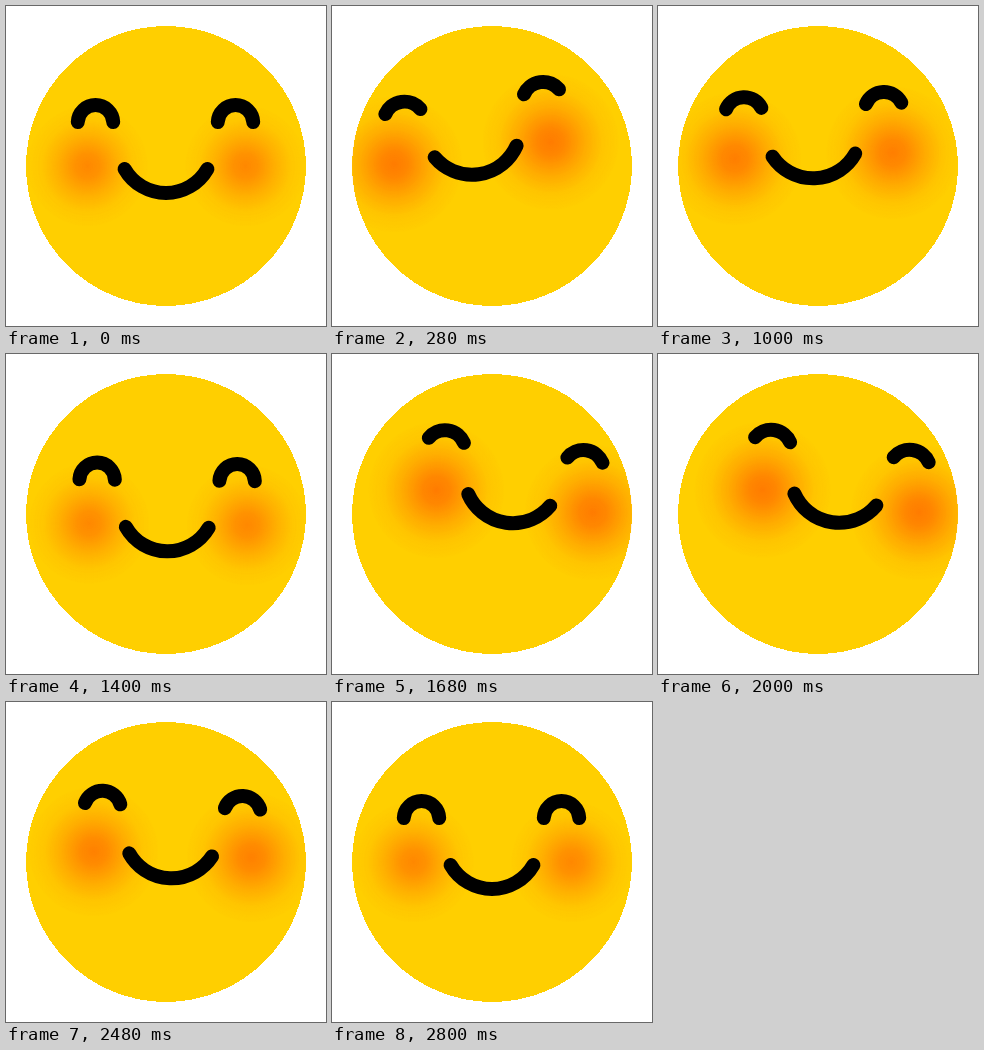
Write an HTML page that moves like this. It is 320x320 px and loops after 2.84 s.

```html
<!DOCTYPE html>
<html lang="en">
<head>
<meta charset="utf-8">
<title>Swaying smile</title>
<style>
  html, body { margin: 0; width: 100%; height: 100%; overflow: hidden; background: #fff; }
  svg { display: block; width: 100vw; height: 100vh; }
  .line { fill: none; stroke: #000; stroke-width: 14; stroke-linecap: round; }
</style>
</head>
<body>
<svg viewBox="0 0 320 320">
  <defs>
    <radialGradient id="glow">
      <stop offset="0" stop-color="#ff7600"/>
      <stop offset=".2" stop-color="#ff7600" stop-opacity=".86"/>
      <stop offset=".5" stop-color="#ff7600" stop-opacity=".42"/>
      <stop offset=".75" stop-color="#ff7600" stop-opacity=".12"/>
      <stop offset="1" stop-color="#ff7600" stop-opacity="0"/>
    </radialGradient>
    <clipPath id="face"><circle cx="160" cy="160" r="140"/></clipPath>
  </defs>
  <circle cx="160" cy="160" r="140" fill="#ffcf00" shape-rendering="crispEdges"/>
  <g clip-path="url(#face)">
    <g id="blush" fill="url(#glow)">
      <circle cx="-79"/>
      <circle cx="79"/>
    </g>
    <path id="mouth" class="line"/>
    <path id="eyes" class="line"/>
  </g>
</svg>
<script>
const LOOP = 2840, STEP = 40, TILT = 8.2, DIP = 10.3;

// Each part has a resting place and its own reach, which gives the face depth
const parts = {
  eyes:  { x: 159.5, y: 116, sway: 22, lift: 20.3, drift: 2.4 },
  mouth: { x: 160, y: 163, sway: 17, lift: 17.5, drift: 0.4 },
  blush: { x: 160.5, y: 160, sway: 21.3, lift: 13, drift: 1 }
};

const el = id => document.getElementById(id);
const cheeks = el("blush").children;

function ease(t, from, to) {
  const u = Math.min(1, Math.max(0, (t - from) / (to - from)));
  return u * u * (3 - 2 * u);
}

// -1 leans left, 1 leans right
function swayAt(t) {
  const left = ease(t, 0, 300) - ease(t, 600, 1200);
  const right = ease(t, 1340, 1700) - ease(t, 2040, 2700);
  return right - left;
}

// 1 looks up, 0 rests, -1 dips between the two leans
function levelAt(t) {
  return ease(t, 0, 280) - 2 * ease(t, 900, 1400)
    + 2 * ease(t, 1400, 1700) - ease(t, 2220, 2800);
}

// Circular arc of a given half width and height; sweep 1 bulges upward
function arc(x, half, height, sweep) {
  const r = (half * half + height * height) / (2 * height);
  return `M${x - half} 0A${r} ${r} 0 0 ${sweep} ${x + half} 0`;
}

function draw(t) {
  const sway = swayAt(t), level = levelAt(t);
  const up = Math.max(0, level), down = Math.max(0, -level);

  for (const id in parts) {
    const p = parts[id];
    const x = p.x + p.sway * sway + p.drift * up;
    const y = p.y - p.lift * up + DIP * down;
    el(id).setAttribute("transform", `translate(${x} ${y}) rotate(${TILT * sway})`);
  }

  // Looking up flattens the features and warms the cheeks
  const arch = 17 - 7.2 * up;
  el("eyes").setAttribute("d", arc(-70, 17.7, arch, 1) + arc(70, 17.7, arch, 1));
  el("mouth").setAttribute("d", arc(0, 41.4, 24 - up, 0));
  el("blush").setAttribute("opacity", 0.8 + 0.14 * up);
  for (const c of cheeks) c.setAttribute("r", 61 + 8 * up);
}

const start = performance.now();
function tick() {
  const t = (performance.now() - start) % LOOP;
  draw(Math.floor(t / STEP) * STEP);
  requestAnimationFrame(tick);
}
draw(0);
requestAnimationFrame(tick);
</script>
</body>
</html>
```
